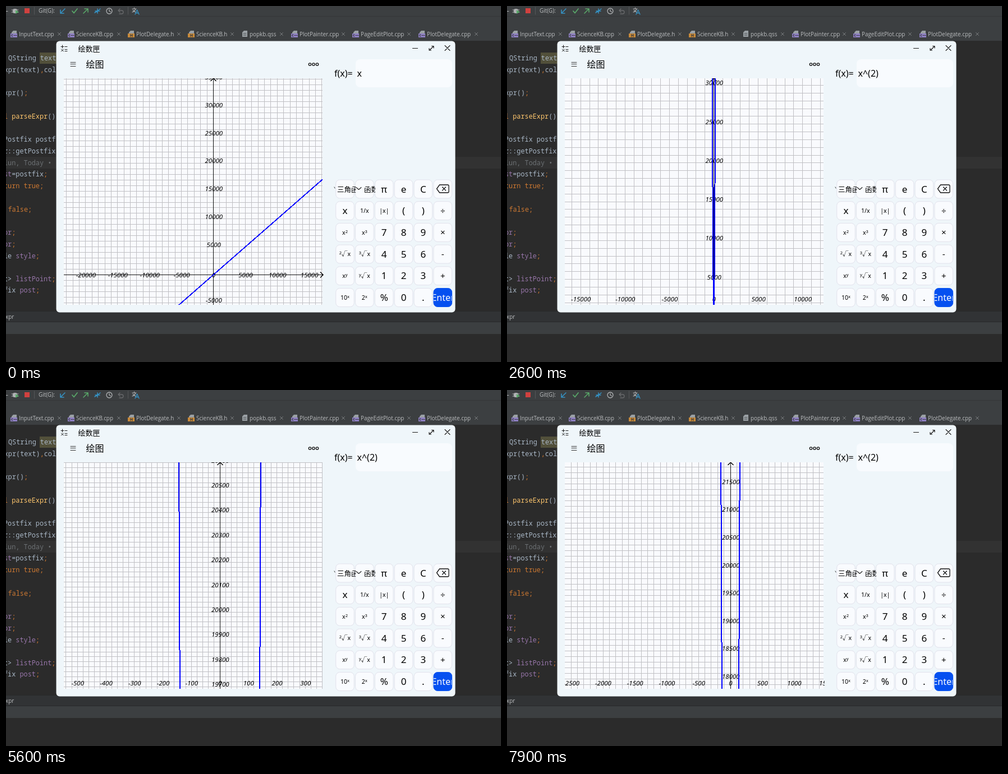
An HTML page that plays this animation: 882x635 px, repeating every 8000 ms.

```html
<!DOCTYPE html>
<html lang="zh">
<head>
<meta charset="utf-8">
<style>
  html, body { margin: 0; width: 100%; height: 100%; overflow: hidden; background: #2b2b2b; }
  svg { display: block; width: 882px; height: 635px; }
  text { font-family: "Noto Sans", "Noto Sans CJK SC", "Noto Sans CJK", sans-serif; white-space: pre; }
  .code text { font: 11.85px "Noto Sans Mono", monospace; fill: #a9b7c6; }
  .code .k { fill: #cc7832; }
  .code .p { fill: #9876aa; }
  .code .f { fill: #ffc66d; }
  .code .c { fill: #6c7073; }
  .ui text { font-size: 9.9px; font-family: "Open Sans", sans-serif; fill: #bbbdbf; }
  .mid { text-anchor: middle; }
  .line { fill: none; stroke-linecap: round; stroke-linejoin: round; }
  #plot text { font-size: 11.5px; font-style: italic; text-anchor: middle; }
  #plot path { fill: none; shape-rendering: crispEdges; }
</style>
</head>
<body>
<svg id="stage" viewBox="0 0 882 635" xmlns="http://www.w3.org/2000/svg"></svg>
<script>
const stage = document.getElementById('stage');
const LOOP = 8000;
const P = { l: 103, t: 129, r: 564, b: 533 };
const REF = 20000, ASPECT = 0.875;

const rect = (x, y, w, h, fill, more = '') =>
  `<rect x="${x}" y="${y}" width="${w}" height="${h}" fill="${fill}" ${more}/>`;
const text = (x, y, s, more = '') => `<text x="${x}" y="${y}" ${more}>${s}</text>`;
const line = (d, stroke, w = 1, more = '') =>
  `<path class="line" d="${d}" stroke="${stroke}" stroke-width="${w}" ${more}/>`;
const span = (cls, s) => `<tspan class="${cls}">${s}</tspan>`;

// Code editor behind the window
function editor() {
  const end = span('k', ';');
  const code = [
    [4, 97, 'QString text'],
    [-3.3, 118, 'xpr(text)' + span('k', ',') + 'col'],
    [-3.5, 159, 'xpr()' + end],
    [-4, 201, span('k', 'l ') + span('f', 'parseExpr') + '()'],
    [-4, 242, 'Postfix postf'],
    [-4, 263, 'r::getPostfix'],
    [-4, 284, span('c', 'lun, Today •')],
    [-4, 304, span('p', 'st') + '=postfix' + end],
    [-4, 325, span('k', 'turn true;')],
    [3.5, 367, span('k', 'false;')],
    [-4, 408, span('p', 'pr') + end],
    [-4, 429, span('p', 'pr') + end],
    [-4, 450, 'le ' + span('p', 'style') + end],
    [-4, 491, 't&gt; ' + span('p', 'listPoint') + end],
    [-4, 511, 'fix ' + span('p', 'post') + end]
  ];
  return rect(0, 0, 882, 635, '#2b2b2b') + rect(0, 269, 882, 21, '#323232') +
    rect(60, 83, 30, 20, '#52503a') +
    `<g class="code">${code.map(c => text(...c)).join('')}</g>`;
}

function toolbar() {
  const blue = '#3592c4', green = '#59a869', grey = '#afb1b3';
  return rect(0, 0, 882, 62, '#3c3f41') + rect(0, 18, 882, 1, '#343638') +
    line('M0 9.5h3', grey) +
    rect(12, 5, 8, 8, grey, 'rx="3"') + line('M10 7h12M10 11h12', grey) +
    `<path d="M17 7l6 3.5-6 3.5z" fill="${green}"/>` +
    rect(33, 4, 9, 9, '#d0413f') +
    line('M50.5 2v13M217.5 2v13', '#555759') +
    text(58, 12, 'Git(G):') +
    line('M105 5l-8 8M97 7v6h6', blue, 1.6) +
    line('M118 9l3 3.5 6-7.5', green, 1.8) +
    line('M138 13l8-8M140 5h6v6', green, 1.6) +
    line('M158 12l5-3M163 9v4M163 9h-4M168 5l-5 4M163 9h4M163 9v-4', blue, 1.5) +
    line('M184 6v3l2.5 1.5', grey, 1.2) +
    `<circle cx="184" cy="9" r="5" fill="none" stroke="${grey}" stroke-width="1.3"/>` +
    line('M203 5l-3 3 3 3M200 8h6a3 3 0 0 1 0 6h-4', '#686a6c', 1.3) +
    line('M225 5h7M228.500 3v2M231 5q-1 4-6 6M226 7q2 3 5 4', grey, 1.1) +
    line('M230 15l3.500-8 3.500 8M231 12.500h5', blue, 1.3);
}

function tabs() {
  const list = [
    ['InputText.cpp', 8, 95], ['ScienceKB.cpp', 110, 201], ['PlotDelegate.h', 217, 308],
    ['ScienceKB.h', 324, 403], ['popkb.qss', 419, 491], ['PlotPainter.cpp', 508, 601],
    ['PageEditPlot.cpp', 617, 718], ['PlotDelegate.cpp', 735, 838]
  ];
  return list.map(([name, x, close]) => {
    const ext = name.split('.')[1];
    const page = `<path d="M${x + 5} 44h6v11h-9v-8z" fill="#9aa0a4"/>`;
    const tag = ext === 'qss' ? line(`M${x + 4} 49h5M${x + 4} 52h5`, '#4b4f52')
      : rect(x, 49, 12, 7, ext === 'h' ? '#c88a3a' : '#8f80c4') +
        line(ext === 'h' ? `M${x + 5} 50v5M${x + 8} 50v5M${x + 5} 52.5h3`
          : `M${x + 4} 51h-2v3h2M${x + 6} 52.500h2M${x + 9} 52.500h2`, '#34373a');
    return page + tag + text(x + 15, 54, name) +
      line(`M${close - 2.500} 47.500l5 5M${close + 2.500} 47.500l-5 5`, '#7b7e80');
  }).join('');
}

function footer() {
  return rect(0, 545, 882, 18, '#313335') + rect(0, 563, 882, 22, '#3c3f41') +
    line('M0 544.5h882M0 563.5h882', '#28292a') +
    text(-1, 558, 'xpr');
}

function frame() {
  const ink = '#1c1c1c';
  return rect(89.500, 62.500, 711, 484, '#eff6fa', 'rx="6"') +
    line('M98 72.500h5M100.500 70v5M105 72.500h4M98.500 77l4 4M102.500 77l-4 4M105 77.500h4M105 80.500h4', ink) +
    text(128.500, 80.500, '绘数匣', 'font-size="13"') +
    line('M724.5 75.500h9M782 70.500l9 9M791 70.500l-9 9', ink, 1.1) +
    line('M755 78.500l6-6M758.500 71.500h3.500v3.500M754 75.500v3.500h3.500', ink, 1.2) +
    line('M115 100.500h9M115 103.500h9M115 107.500h9', '#333') +
    text(142.500, 110, '绘图', 'font-size="16"') +
    [541.5, 548, 554.5].map(x =>
      `<circle cx="${x}" cy="104" r="2.200" fill="none" stroke="#111" stroke-width="1.300"/>`).join('') +
    text(585, 125.500, 'f(x)=', 'font-size="16"') +
    rect(623, 95, 172, 50, '#f8fbfe', 'rx="8"') +
    text(625.500, 125.500, 'x', 'id="expr" font-size="16"');
}

// Keypad
const keyX = c => 604 + 34.85 * c;
const keyY = r => 326.500 + 38.7 * r;

function keypad() {
  const up = s => `<tspan dy="-3" font-size="7.500">${s}</tspan>`;
  const root = s => up(s) + '<tspan dy="3">√x</tspan>';
  const rows = [
    ['', '', 'π', 'e', 'C', ''],
    ['x', '1/x', '|x|', '(', ')', '÷'],
    ['x' + up(2), 'x' + up(3), '7', '8', '9', '×'],
    [root(2), root(3), '4', '5', '6', '-'],
    ['x' + up('y'), root('y'), '1', '2', '3', '+'],
    ['10' + up('x'), '2' + up('x'), '%', '0', '.', 'Enter']
  ];
  let out = '';
  rows.forEach((row, r) => row.forEach((label, c) => {
    const x = keyX(c), y = keyY(r), enter = label === 'Enter';
    out += rect(x - 16.3, y - 16.5, 32.6, 33, enter ? '#0550f0' : '#f9fbfe',
      `rx="7" stroke="${enter ? '#0550f0' : '#e2e2ec'}" id="k${r}${c}"`);
    const size = enter ? 16 : label.length === 1 ? (c === 5 ? 15 : 17) : 10.5;
    const more = enter ? 'fill="#fff" clip-path="url(#enterClip)"' : '';
    out += text(enter ? 778.500 : x, y + size * 0.36, label, `class="mid" font-size="${size}" ${more}`);
  }));
  return out +
    `<g font-size="12.500"><g clip-path="url(#trigClip)">${text(590, 331.500, '三角函数')}</g>` +
    `<g clip-path="url(#funcClip)">${text(638, 331.500, '函数')}</g></g>` +
    line('M624 323.500l4.500 4 4.500-4', '#222', 1.1) + line('M585 323l1 2', '#333') +
    line('M767.500 326l5-7h14.500q2 0 2 2v10q0 2-2 2h-14.500zM777.500 323l6 6M783.500 323l-6 6', '#111', 1.3);
}

const clip = (id, x, y, w, h) => `<clipPath id="${id}">${rect(x, y, w, h, '#000')}</clipPath>`;

stage.innerHTML =
  '<defs>' + clip('plotClip', P.l, P.t, P.r - P.l + 2, P.b - P.t) +
  clip('enterClip', 762, 503, 32, 34) + clip('trigClip', 588, 310, 35, 34) +
  clip('funcClip', 634, 310, 24, 34) + '</defs>' +
  editor() + `<g class="ui">${toolbar()}${tabs()}${footer()}</g>` + frame() + keypad() +
  rect(P.l, P.t, P.r - P.l, P.b - P.t, '#f9fafd') +
  `<g id="plot" clip-path="url(#plotClip)">
    <path id="grid" stroke="#c0c0c4"/><path id="axes" stroke="#111"/>
    <g id="labels"></g><path id="curve" stroke="#0000ff" stroke-width="2"/></g>`;

const el = id => document.getElementById(id);
const grid = el('grid'), axes = el('axes'), labels = el('labels'), curve = el('curve'), expr = el('expr');

// Moments at which the view jumps, and poses: [jump count, px per unit, px of x = 0, px of y = REF]
const jumps = [20, 21, 22, 23, 24, 26, 27, 29, 30, 32, 34, 35, 38, 42, 43, 44, 56,
  57, 58, 66, 67, 69, 70, 75, 76, 78, 79].map(n => n * 100);
const poses = [
  [0, 0.01138, 369.5, 280.3], [6, 0.01582, 368.5, 279.9], [12, 0.2335, 353, 163],
  [17, 0.5075, 381, 396], [23, 0.537, 382, 449.5], [27, 0.1135, 398, 316.5]
];
const hoverPath = ['k15', 'k25', 'k24', 'k22', 'k21', 'k20'];

// Scale runs geometrically; offsets follow it linearly, as in a zoom about a fixed point
function viewAt(t) {
  const n = jumps.filter(j => j <= t).length;
  const i = Math.min(poses.findLastIndex(p => p[0] <= n), poses.length - 2);
  const [n0, s0, x0, y0] = poses[i], [n1, s1, x1, y1] = poses[i + 1];
  const sx = s0 * (s1 / s0) ** ((n - n0) / (n1 - n0));
  const k = (sx - s0) / (s1 - s0);
  return { sx, sy: sx * ASPECT, x0: x0 + (x1 - x0) * k, yRef: y0 + (y1 - y0) * k };
}

function niceStep(min) {
  const base = 10 ** Math.floor(Math.log10(min));
  return base * [1, 2, 5, 10].find(m => m * base >= min);
}

function drawPlot(v, f) {
  const px = u => v.x0 + u * v.sx, py = w => v.yRef - (w - REF) * v.sy;
  const snap = n => Math.floor(n) + 0.5;
  const major = niceStep(49 / v.sx), minor = major / 5;
  const each = (lo, hi, step, fn) => {
    for (let i = Math.ceil(lo / step); i <= hi / step; i++) fn(Math.round(i * step));
  };
  const left = (P.l - v.x0) / v.sx, right = (P.r - v.x0) / v.sx;
  const top = REF + (v.yRef - P.t) / v.sy, bottom = REF + (v.yRef - P.b) / v.sy;

  let d = '';
  each(left, right, minor, u => d += `M${snap(px(u))} ${P.t}V${P.b}`);
  each(bottom, top, minor, w => d += `M${P.l} ${snap(py(w))}H${P.r}`);
  grid.setAttribute('d', d);

  const ax = snap(v.x0), ay = snap(py(0));
  d = `M${ax} ${P.b}V${P.t}M${ax - 5} ${P.t + 5}l5-5 5 5`;
  if (ay < P.b) d += `M${P.l} ${ay}H${P.r + 1}M${P.r - 4} ${ay - 5}l5 5-5 5`;
  axes.setAttribute('d', d);

  let s = '';
  const base = Math.min(py(0) + 5, 527);
  each(left - major, right + major, major, u => s += text(px(u) + 0.5, base, u));
  each(bottom - major, top + major, major, w => { if (w) s += text(v.x0 + 0.8, py(w), w); });
  labels.innerHTML = s;

  const pts = [];
  for (let x = P.l; x <= P.r; x++) {
    const y = py(f((x - v.x0) / v.sx));
    if (y > -5000) pts.push(x + ' ' + y.toFixed(1));
  }
  curve.setAttribute('d', 'M' + pts.join('L'));
}

let drawn = -1;
function draw(t) {
  const tick = Math.floor(t / 100);
  if (tick === drawn) return;
  drawn = tick;
  expr.textContent = t < 1200 ? 'x' : 'x^(2)';
  const at = t < 500 || t >= 2000 ? -1 : Math.min(tick - 5, hoverPath.length - 1);
  hoverPath.forEach((id, i) => el(id).setAttribute('fill', i === at ? '#f3f6fc' : '#f9fbfe'));
  drawPlot(viewAt(t), t < 1300 ? u => u : u => u * u);
}

function loop(now) {
  draw(now % LOOP);
  requestAnimationFrame(loop);
}
draw(0);
requestAnimationFrame(loop);
</script>
</body>
</html>
```
